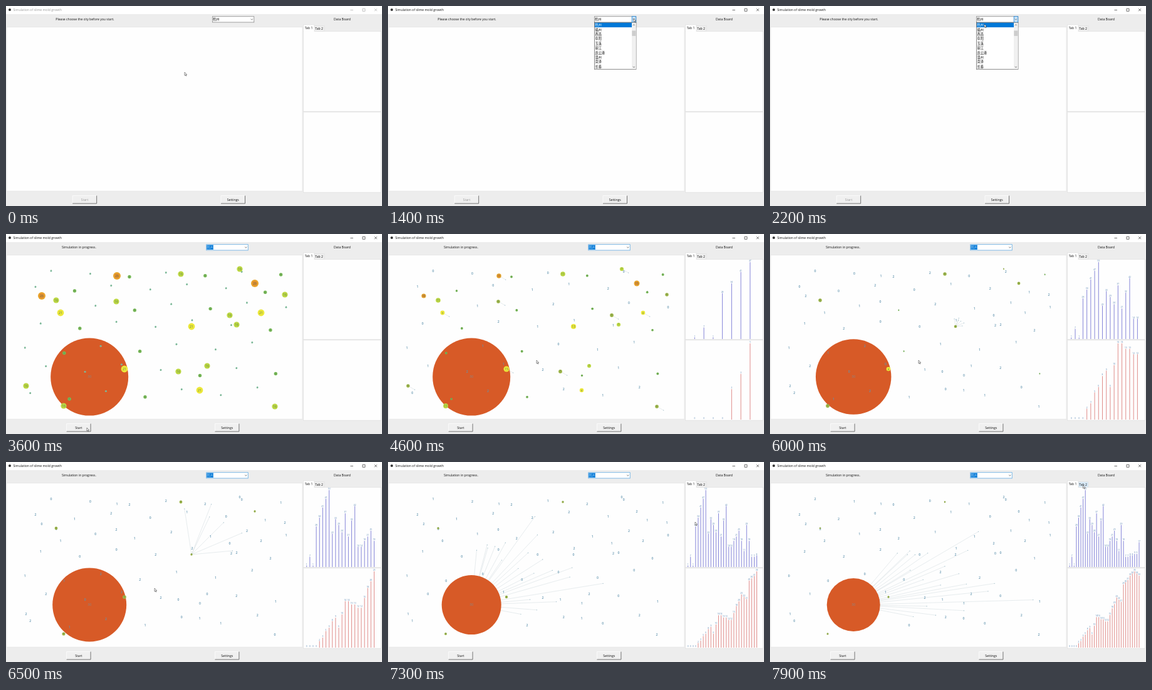
An HTML page for the animation above (8000 ms loop, 600x320 px).

```html
<!DOCTYPE html>
<html lang="en">
<head>
<meta charset="utf-8">
<title>Slime mold growth</title>
<style>
html, body { margin: 0; width: 100%; height: 100%; overflow: hidden; background: #ededed; }
svg { display: block; width: 600px; height: 320px; font-family: "Open Sans", "Noto Sans CJK SC", "Noto Sans CJK", sans-serif; }
</style>
</head>
<body>
<svg id="stage" viewBox="0 0 600 320" xmlns="http://www.w3.org/2000/svg"></svg>
<script>
const LOOP = 8000, TICK = 100, START = 3600;
const HUB = { x: 133.2, y: 228.6 };
const CITIES = ['杭州', '福州', '西昌', '阜阳', '玉溪', '丽江', '连云港', '温州', '菏泽', '长春'];

// Key points: [time, x, y], [time, radius] and [bar, value]
const POINTER = [[100, 285, 106], [800, 392, 20], [1400, 392, 20], [2200, 342, 29], [2800, 342, 29],
  [3400, 129, 310], [3700, 129, 310], [4400, 237, 202], [6600, 237, 202], [7300, 490, 96], [7900, 499.5, 37]];
const HUB_SIZE = [[5300, 62], [6500, 59], [7300, 47.5], [7900, 42.5]];
const SPREAD = [[1, 1], [2, 7], [3, 1], [4, 28], [8, 53], [9, 23], [10, 33], [12, 24], [13, 37], [14, 21],
  [16, 42], [17, 14], [18, 14], [21, 25], [23, 11], [24, 29], [26, 7], [31, 9], [32, 17]];
const TOTAL = [[4, 0], [10, 9], [11, 6], [13, 14], [18, 12], [22, 23], [24, 21], [25, 29], [30, 35], [32, 33]];

// Food sites: [x, y, life in ms]; a site without a life gets a seeded one
const FOOD = [
  { r: 6, fill: '#e8a52c', sites: [[57, 99], [177, 67], [397, 79, 4000]] },
  { r: 5.4, fill: '#ece83a', sites: [[87, 126], [296, 148, 4200], [407, 126], [309, 250], [189, 216, 6200]] },
  { r: 4.6, fill: '#bdd843', sites: [[80, 106, 6000], [176, 108], [279, 64, 6000], [373, 56], [445, 97],
    [357, 130], [368, 145], [275, 220], [321, 211], [32, 243], [92, 275, 6500], [429, 276]] }
];

const frac = v => v - Math.floor(v);
const rand = seed => frac(Math.sin(seed * 127.1 + 11.7) * 43758.5453);
const mix = (a, b, p) => a + (b - a) * p;
const range = n => Array.from({ length: n }, (_, i) => i);

// Piecewise linear lookup in a list of key points
function along(keys, t, col = 1) {
  const i = keys.findIndex(k => k[0] > t);
  if (i < 0) return keys[keys.length - 1][col];
  if (i === 0) return keys[0][col];
  const a = keys[i - 1], b = keys[i];
  return mix(a[col], b[col], (t - a[0]) / (b[0] - a[0]));
}

const food = FOOD.flatMap(({ r, fill, sites }) => sites.map(([x, y, life]) =>
  ({ x, y, r, fill, life: life || mix(2400, 3100, rand(x + y)) })));

// Smaller nodes spread evenly by an additive sequence: first green food, then junctions
const scattered = range(49).map(i => {
  const x = 27 + 425 * frac(0.4 + i * 0.7549), y = 56 + 222 * frac(0.1 + i * 0.5698) ** 1.25;
  return i < 15
    ? { x, y, r: 2.7, fill: '#76b957', life: mix(2400, 4000, rand(i)) }
    : { x, y, r: 1.5, fill: '#86c9ae', life: 1500 };
});
const NODES = [...scattered, ...food].map((n, seed) => ({ ...n, seed }));

// Threads fan out over an arc in degrees; "at" is when they reach their full length
const fan = (count, origin, arc, reach) => range(count).map(i => ({
  ...origin,
  angle: mix(...arc, (i + rand(i + 3)) / count) * Math.PI / 180,
  length: mix(...reach, rand(i * 5 + count))
}));
const BURSTS = [
  { from: 4300, at: 5300, to: 5900, threads: food.filter((_, i) => i % 2).flatMap(n => fan(1, n, [0, 360], [22, 50])) },
  { from: 5900, at: 6500, to: 6900, threads: fan(6, { x: 296, y: 148 }, [-100, -5], [50, 100]) },
  { from: 6900, at: 7300, to: 7600, threads: fan(20, HUB, [-85, 12], [75, 215]), behind: true },
  { from: 7400, at: 7900, to: LOOP, threads: fan(20, HUB, [-50, 12], [90, 290]), behind: true }
];

const rect = (x, y, w, h, fill, edge = 'none') =>
  `<rect x="${x}" y="${y}" width="${w}" height="${h}" fill="${fill}" stroke="${edge}" stroke-width=".7"/>`;
const circle = (x, y, r, fill) => `<circle cx="${x}" cy="${y}" r="${r}" fill="${fill}"/>`;
const path = (d, stroke, width = 0.7, fill = 'none') =>
  `<path d="${d}" stroke="${stroke}" stroke-width="${width}" fill="${fill}"/>`;
const text = (x, y, s, fill = '#111', size = 5.14, anchor = 'middle', weight = 400) =>
  `<text x="${x}" y="${y + size * 0.36}" font-size="${size}" font-weight="${weight}" fill="${fill}" text-anchor="${anchor}">${s}</text>`;
const chevron = (x, y, dir) => path(`M${x - 1.6} ${y - 0.8 * dir}l1.6 ${1.6 * dir}l1.6 ${-1.6 * dir}`, '#444');

function titleBar(active) {
  const ink = active ? '#111' : '#999';
  return rect(0, 0, 600, 13, '#fff') + circle(6, 6, 2, '#333') +
    text(11.5, 6, 'Simulation of slime mold growth', ink, 5.14, 'start') +
    path('M549.5 6.5h4.5M569 4.3h4v4h-4zM588 4.2l4 4m0-4l-4 4', ink, 0.6);
}

function button(x, label, enabled) {
  return rect(x, 303.5, 38.5, 12.5, '#f0f0f0') +
    path(`M${x} 316v-12.5h38.5`, '#fff') + path(`M${x} 316h38.5v-12.5`, '#666', 0.9) +
    text(x + 19.3, 309.7, label, enabled ? '#111' : '#999');
}

function combo(x, hot, picked) {
  return rect(x + 0.4, 16.8, 66.4, 9.2, '#fff', picked ? '#4a9fe0' : '#7a7a7a') +
    (hot ? rect(x + 60.2, 16.8, 6.6, 9.2, '#cce4f7', '#0078d7') : '') +
    (picked ? rect(x + 0.9, 17.6, 10.6, 7.3, '#0078d7') : '') +
    text(x + 1.3, 21.3, CITIES[0], picked ? '#a9d0f2' : '#111', 5.14, 'start') +
    chevron(x + 63.4, 21.4, 1);
}

function dropdown() {
  const rows = CITIES.map((c, i) =>
    text(330.5, 30.4 + i * 7.4, c, i ? '#111' : '#fff', 5.14, 'start')).join('');
  return rect(329.4, 26.4, 66.6, 74.8, '#fff', '#555') + rect(330, 26.8, 59, 7.3, '#0078d7') + rows +
    rect(389, 26.8, 6.7, 74, '#f0f0f0') + rect(389.4, 39.5, 6, 8.4, '#cdcdcd') +
    chevron(392.4, 30.4, -1) + chevron(392.4, 97.6, 1);
}

function dataBoard(hover) {
  const edge = '#dfdfdf';
  return text(536.5, 21.5, 'Data Board') +
    rect(492, 31.8, 16, 9, hover ? '#d9ebf9' : '#f0f0f0', edge) + rect(474.5, 30, 17.5, 11, '#fff', edge) +
    rect(474.5, 40.6, 124, 128.2, '#fefefe', edge) + rect(474.5, 169.8, 124, 128.4, '#fefefe', edge) +
    rect(475, 39.8, 16.6, 1.4, '#fefefe') +
    text(483, 35.4, 'Tab 1') + text(499.7, 36, 'Tab 2');
}

function bars(keys, base, height, color, n) {
  const values = range(n).map(i => Math.round(along(keys, i + 1)));
  const top = Math.max(1, ...values), gap = 118 / (n + 1);
  return values.map((v, i) => {
    const x = 474.6 + gap * (i + 1), y = base - height * v / top;
    return path(`M${x} ${base}V${y}`, color, 0.8) + text(x, y - 2, v, '#4f7fae', 3.2);
  }).join('');
}

function threads(t, behind) {
  return BURSTS.filter(b => !!b.behind === behind && t >= b.from && t < b.to).flatMap(b =>
    b.threads.map(({ x, y, angle, length }) => {
      const reach = length * (t - b.from) / (b.at - b.from);
      const tx = x + reach * Math.cos(angle), ty = y + reach * Math.sin(angle);
      return path(`M${x} ${y}L${tx} ${ty}`, '#c3d0d4', 0.4) + circle(tx, ty, 0.6, '#8fb3c0');
    })).join('');
}

// A node shrinks as it is eaten, then shows a small changing count
function node({ x, y, r, fill, life, seed }, t) {
  if (t >= 7000 && Math.hypot(x - HUB.x, y - HUB.y) < 50) return '';
  const size = r * Math.max(0, 1 - (t - START) / life);
  if (size < 1) {
    const step = Math.floor(t / 900 + rand(seed));
    return text(x, y, Math.floor(rand(seed * 31 + step) * 3), '#6093ae', 5.2, 'middle', 600);
  }
  const tint = r > 3 && size < 3 ? '#9db548' : fill;
  const core = r === 6 && size > 3 ? circle(x, y, size * 0.62, '#e58a2e') : '';
  return circle(x, y, size, tint) + core +
    text(x, y, Math.ceil(size * size * 0.72), '#5d7d4c', Math.min(5.2, 2.6 + size * 0.5));
}

function simulation(t) {
  const n = Math.min(32, Math.floor((t - 3560) * 3 / 400));
  return threads(t, true) + circle(HUB.x, HUB.y, along(HUB_SIZE, t), '#d75a27') + threads(t, false) +
    text(HUB.x, HUB.y, '30', '#8a8583', 5.2) + NODES.map(d => node(d, t)).join('') +
    bars(SPREAD, 168, 123, '#6666cf', n) + bars(TOTAL, 297, 122, '#d8706e', n);
}

function pointer(t) {
  return `<g transform="translate(${along(POINTER, t, 1)} ${along(POINTER, t, 2)})">` +
    path('M0 0V5.2L1.2 4.1L2.1 6L3 5.6L2.1 3.8H3.7Z', '#222', 0.5, '#fff') + '</g>';
}

function draw(t) {
  const running = t >= START, open = t >= 1400 && t < 2400, chosen = t >= 2400;
  const shift = running ? -9.6 : 0;
  stage.innerHTML = rect(0, 0, 600, 320, '#ededed') + titleBar(t >= 1000) +
    text(126 + shift, 21.4, running ? 'Simulation in progress.' : 'Please choose the city before you start.') +
    rect(1, 33.8, 472, 262.4, '#fefefe', '#e4e4e4') + dataBoard(t >= 7800) +
    combo(329 + shift, t >= 800 && !chosen, chosen) +
    button(106.2 + shift, 'Start', chosen) + button(343 + shift, 'Settings', true) +
    (running ? simulation(t) : '') + (open ? dropdown() : '') + pointer(t);
}

const stage = document.getElementById('stage');
let last = -1;
function frame(now) {
  const t = Math.floor(now % LOOP / TICK) * TICK;
  if (t !== last) draw(last = t);
  requestAnimationFrame(frame);
}
draw(0);
requestAnimationFrame(frame);
</script>
</body>
</html>
```
